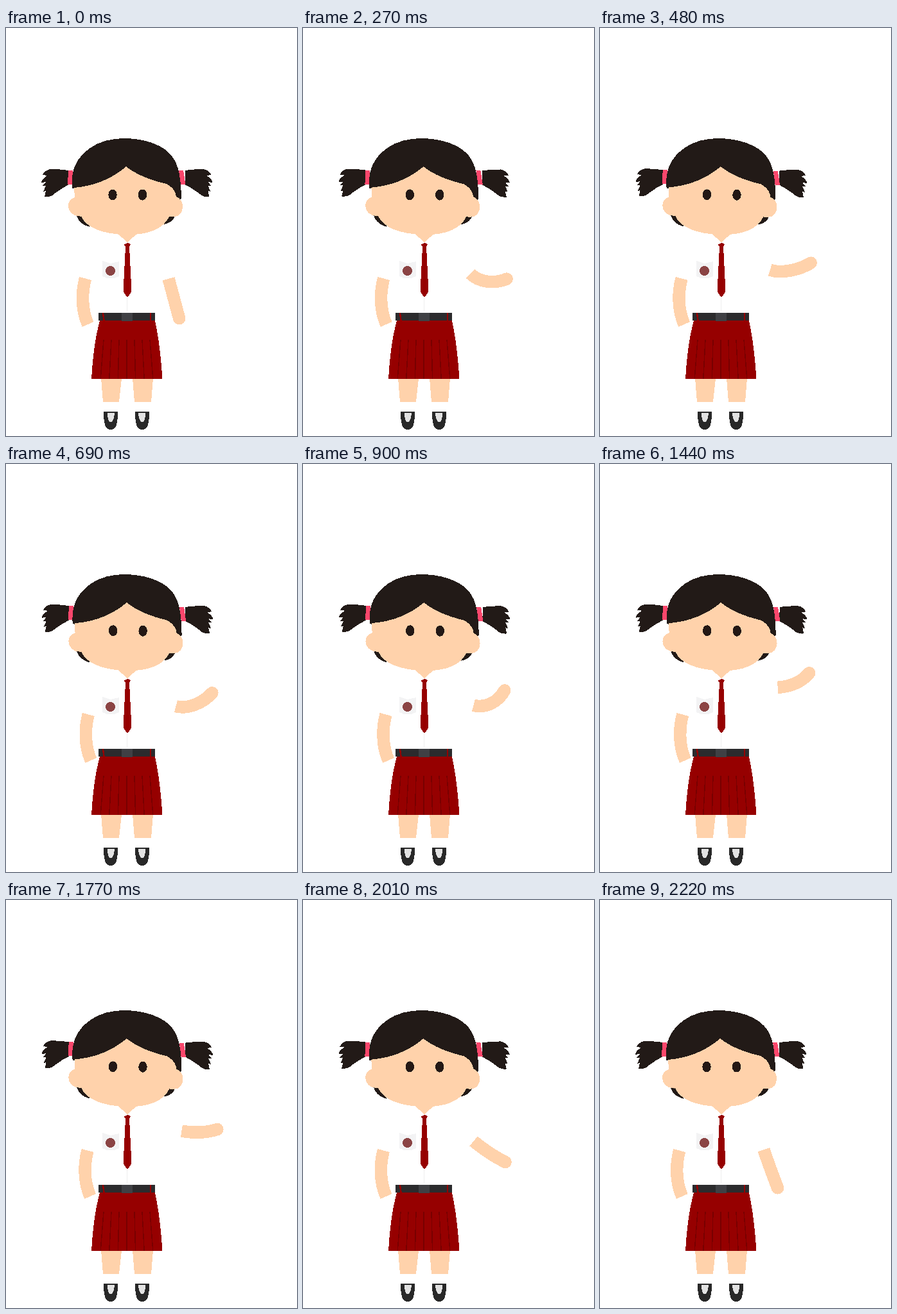
Animation of 453x636 px, one loop 2250 ms. Source, as an HTML page:

```html
<!DOCTYPE html>
<html lang="en">
<head>
<meta charset="utf-8">
<title>Waving schoolgirl</title>
<style>
  html, body { margin: 0; width: 100%; height: 100%; overflow: hidden; background: #fff; }
  svg { display: block; width: 100%; height: 100%; shape-rendering: crispEdges; }
  .skin { fill: #ffd2ab; }
  .hair { fill: #221a17; }
  .ribbon { fill: #fb476c; }
  .red { fill: #960000; }
  .arm { fill: none; stroke: #ffd2ab; stroke-width: 19.5; }
</style>
</head>
<body>
<svg viewBox="0 0 453 636">
  <defs>
    <g id="shoe">
      <path fill="#282828" d="M152 598H174C174 616 172 626 163 626S152 616 152 598Z"/>
      <path fill="#e2e2e2" d="M158 600H169Q168 614 163 614T158 600Z"/>
    </g>
    <path id="pigtail" class="hair" d="M98 222Q84 220 69 220Q60 222 57 229L64 230Q55 236 55 241L62 240L57 246L62 246L58 255L62 254L60 263Q66 264 72 261Q84 251 98 244Z"/>
  </defs>

  <path class="skin" d="M148 546H180L176 583H151ZM197 546H229L226 583H200Z"/>
  <use href="#shoe"/>
  <use href="#shoe" transform="matrix(-1 0 0 1 375 0)"/>

  <path class="arm" id="restArm" d="M123.500 390.500C118 411 117 438 127.500 462"/>
  <path class="arm" id="waveArm"/>
  <circle class="skin" id="hand" r="9.75"/>

  <path class="red" d="M146 456H232Q240 493 243.500 547H133Q136 493 146 456Z"/>
  <path id="pleats" fill="none" stroke="#780000" stroke-width="1.5"/>
  <path fill="#2b2b2d" d="M144 443.500H232V456H144Z"/>
  <path fill="#3f4044" d="M180 444H197V457H180Z"/>
  <path class="red" d="M149.500 443.500H152L154 457H151.500ZM224 443.500H226.500L226 457H223.500Z"/>
  <path stroke="#eee" d="M188.500 418V443"/>

  <path fill="#f3f3f4" d="M150 363L163 367L176 364V387Q163 394 150 387Z"/>
  <circle cx="162.500" cy="378.500" r="7.500" fill="#8b4444"/>

  <path class="skin" d="M172 319H206L189 334Z"/>
  <path class="red" d="M183.500 338Q188.500 333 194 337L192 341L195.500 411L189 420L182.500 411L186 341Z"/>

  <g id="head">
    <path class="hair" d="M109 289Q112 305 130 310L124 285ZM264 289Q262 303 246 306L252 285Z"/>
    <use href="#pigtail"/>
    <use href="#pigtail" transform="matrix(-1 0 0 1 376.500 0)"/>
    <path class="ribbon" d="M97 222H104V244H96ZM269 222H276L279.500 244H272Z"/>
    <path class="hair" d="M103 250C101 226 106 205 131 187C158 167 208 168 239 184C265 198 272 218 273 266L262 274Z"/>
    <path class="skin" d="M106 249Q153 245 187 216Q210 234 250 243Q264 251 265 263C279 267 279 294 261 294.500L254 294Q241 322 188 322.500Q129 320 117 293.500C95 295 90 269 107 264Z"/>
    <g fill="#231815">
      <ellipse cx="166" cy="260" rx="6.700" ry="8.500"/>
      <ellipse cx="212.500" cy="260" rx="6.700" ry="8.500"/>
    </g>
  </g>
</svg>
<script>
  const LOOP = 2250, STEP = 30;
  const $ = id => document.getElementById(id);

  // Key poses of the wave: time, then angles of shoulder, upper arm and forearm
  const poses = [
    [0, 47, 75, 75],
    [270, 39, 45, -23],
    [480, 34, 17, -32],
    [900, 33, 15, -61],
    [1440, 11, -4, -50],
    [1770, 20, 9, -18],
    [LOOP, 47, 75, 75]
  ];

  function slope(i, j) {
    const a = poses[Math.max(i - 1, 0)], b = poses[Math.min(i + 1, poses.length - 1)];
    return (b[j] - a[j]) / (b[0] - a[0]);
  }

  // Smooth cubic interpolation of the angles
  function anglesAt(t) {
    const i = poses.findIndex(p => p[0] > t) - 1;
    const a = poses[i], b = poses[i + 1], d = b[0] - a[0];
    const u = (t - a[0]) / d, v = 1 - u;
    return [1, 2, 3].map(j => v * v * (1 + 2 * u) * a[j] + u * u * (3 - 2 * u) * b[j]
      + d * u * v * (v * slope(i, j) - u * slope(i + 1, j)));
  }

  function move([x, y], angle, length) {
    const a = angle * Math.PI / 180;
    return [x + length * Math.cos(a), y + length * Math.sin(a)];
  }

  function drawWave(t) {
    const [shoulder, upper, fore] = anglesAt(t);
    const foreLength = 32 + 7 * Math.sin(2 * Math.PI * t / LOOP);
    const sleeve = move([199.5, 333.4], shoulder, 78.6);
    const elbow = move(sleeve, upper, 32);
    const hand = move(elbow, fore, foreLength);
    const bend = [move(sleeve, upper, 20), move(hand, fore, -20)];
    $('waveArm').setAttribute('d', `M${sleeve}C${bend} ${hand}`);
    $('hand').setAttribute('cx', hand[0]);
    $('hand').setAttribute('cy', hand[1]);
  }

  function draw() {
    const t = Math.floor(performance.now() % LOOP / STEP) * STEP;
    const sway = Math.sin(Math.PI * t / LOOP);
    $('head').setAttribute('transform', `rotate(${0.65 * sway} 188 330)`);
    $('restArm').setAttribute('transform', `translate(${5.8 * sway})`);
    drawWave(t);
    requestAnimationFrame(draw);
  }

  let pleats = '';
  for (let i = -3; i <= 3; i++) pleats += `M${188 + i * 12} 486L${188 + i * 13.6} 547`;
  $('pleats').setAttribute('d', pleats);
  draw();
</script>
</body>
</html>
```
